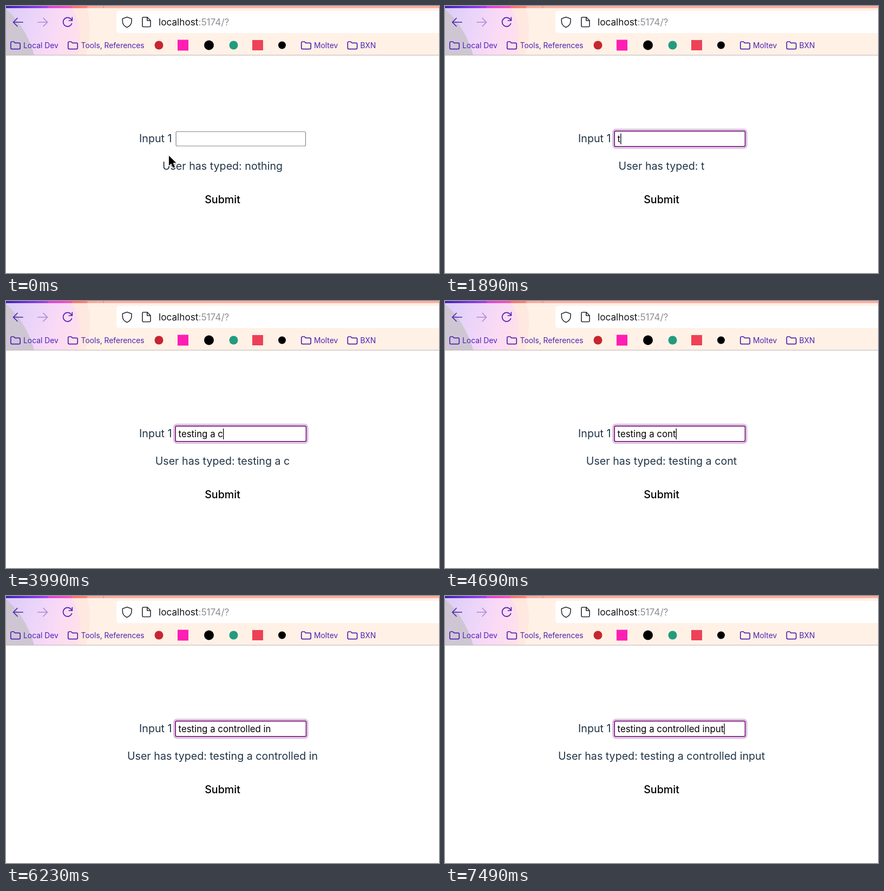
An HTML page that plays this animation: 800 by 494 pixels, repeating every 8000 ms.

```html
<!DOCTYPE html>
<html lang="en">
<head>
<meta charset="utf-8">
<title>Controlled input</title>
<style>
  html, body { margin: 0; width: 100%; height: 100%; overflow: hidden; background: #fff; }
  svg { display: block; width: 100%; height: 100%; }
  text { font-family: Inter, "Open Sans", sans-serif; white-space: pre; }
  .page { font-size: 19.65px; fill: #213547; }
  .mid { text-anchor: middle; }
  .submit { font-weight: 500; fill: #000; }
  .value { font-size: 16.82px; fill: #000; }
  .url { font-size: 17.2px; fill: #15141a; }
  .mark { font-size: 13.85px; fill: #4f22b4; }
  .line { fill: none; stroke: #4f22b4; stroke-width: 1.7; stroke-linecap: round; stroke-linejoin: round; }
  .dark { stroke: #2b2a33; stroke-width: 1.6; }
  .ring { fill: none; stroke: #8d2a97; stroke-width: 3.2; }
  .cursor { fill: #000; stroke: #fff; stroke-width: 2.4; stroke-linejoin: round; paint-order: stroke;
            filter: drop-shadow(0 1px 1px rgba(0, 0, 0, .3)); }
</style>
</head>
<body>
<svg viewBox="0 0 800 494">
  <defs>
    <linearGradient id="strip" gradientUnits="userSpaceOnUse" x1="0" x2="181" y1="0" y2="0">
      <stop offset="0" stop-color="#3f22b8"/>
      <stop offset=".25" stop-color="#7a35ea"/>
      <stop offset=".42" stop-color="#a63df0"/>
      <stop offset=".43" stop-color="#dd40e2"/>
      <stop offset=".66" stop-color="#ff4fb8"/>
      <stop offset=".68" stop-color="#ff7070"/>
      <stop offset=".82" stop-color="#ff8076"/>
      <stop offset=".84" stop-color="#ffa79b"/>
      <stop offset="1" stop-color="#ffada2"/>
    </linearGradient>
    <linearGradient id="haze" gradientUnits="userSpaceOnUse" x1="0" x2="138" y1="10" y2="50">
      <stop offset="0" stop-color="#dccdf7"/>
      <stop offset=".4" stop-color="#ecd5f9"/>
      <stop offset=".7" stop-color="#fadaf5"/>
      <stop offset="1" stop-color="#ffe0ea"/>
    </linearGradient>
    <path id="folder" d="M.8 12.6V3a2 2 0 0 1 2-2h3.6l2.3 2.4h7.5a2 2 0 0 1 2 2v7.2a2 2 0 0 1-2 2H2.8a2 2 0 0 1-2-2z"/>
  </defs>

  <!-- toolbar -->
  <rect width="800" height="91" fill="#fff1e6"/>
  <path d="M0 4H150C157 30 157 60 147 91H0z" fill="#ffe8df"/>
  <path d="M0 4H122C138 30 140 60 133 91H0z" fill="url(#haze)"/>
  <path d="M0 6C22 24 43 56 52 91H0z" fill="#cec7d3"/>
  <rect width="800" height="4" fill="#ffada2"/>
  <rect width="181" height="4" fill="url(#strip)"/>
  <rect x="180" width="1" height="4" fill="#c98880"/>
  <rect y="90.5" width="800" height="1" fill="#bdb2b0"/>
  <rect x="204" y="9" width="610" height="41" rx="5" fill="#fff"/>

  <g class="line">
    <path d="M31 30H13.5M21 22.5L13.5 30L21 37.5"/>
    <path d="M59 30H76.5M69 22.5L76.5 30L69 37.5" opacity=".42"/>
    <path d="M121.5 32.5A8.2 8.2 0 1 1 120 24.2L122 26.5M122.3 21V27H116.3"/>
    <use href="#folder" x="8" y="65"/>
    <use href="#folder" x="114" y="65"/>
    <use href="#folder" x="545" y="65"/>
    <use href="#folder" x="630.5" y="65"/>
  </g>
  <g class="line dark">
    <path d="M223.5 20.5L232 23.5V28C232 33.5 228.5 37.5 223.5 39.5C218.5 37.5 215.3 33.5 215.3 28V23.5z"/>
    <path d="M254 20.8H261L267 26.8V36.5a2 2 0 0 1-2 2H254a2 2 0 0 1-2-2V22.8a2 2 0 0 1 2-2zM260.8 21V27H267"/>
  </g>
  <text class="url" x="282" y="36">localhost<tspan fill="#8f8c93">:5174/?</tspan></text>

  <g class="mark">
    <text x="32" y="78">Local Dev</text>
    <text x="138.6" y="78">Tools, References</text>
    <text x="569" y="78">Moltev</text>
    <text x="654.5" y="78">BXN</text>
  </g>
  <circle cx="282.5" cy="72.5" r="8" fill="#c7252f"/>
  <rect x="317" y="62.5" width="20" height="20" fill="#ff1db4"/>
  <circle cx="375" cy="72.5" r="9" fill="#000"/>
  <circle cx="420.5" cy="72.5" r="8" fill="#229b7e"/>
  <rect x="455" y="63" width="20" height="19" fill="#ee4056"/>
  <circle cx="510" cy="72.5" r="7" fill="#000"/>

  <!-- form -->
  <text class="page" x="246" y="252">Input 1</text>
  <rect id="idle" x="314.1" y="232.5" width="239.4" height="26.5" rx="2" fill="#fff" stroke="#858589" stroke-width="1.2"/>
  <g id="focus">
    <rect x="310.2" y="228.2" width="247.2" height="34.8" rx="5.5" fill="#fff" stroke="#d9c2db" stroke-width="2.4"/>
    <rect x="313" y="231.4" width="241.6" height="28.6" rx="2.5" fill="#fff" stroke="#8c2f91" stroke-width="2.1"/>
  </g>
  <text id="value" class="value" x="318.6" y="252"></text>
  <rect id="caret" y="236" width="1.3" height="20" fill="#000"/>
  <text id="echo" class="page mid" x="400" y="303"></text>
  <text class="page mid submit" x="400" y="364.5">Submit</text>

  <circle id="ring" class="ring" cx="340" cy="237"/>
  <path id="cursor" class="cursor" d="M0 0V18.5L4.2 14.6L7.6 22.3L11 20.8L7.7 13.3H13.4z"/>
</svg>
<script>
  const LOOP = 8000, STEP = 70, BLINK = 560, CLICK = 770;
  const phrase = "testing a controlled input";
  // moment each letter of the phrase is typed
  const keys = [1890, 2100, 2310, 2590, 2870, 3150, 3290, 3430, 3640, 3780, 3990, 4200, 4410, 4620,
                4760, 4830, 4900, 4970, 5040, 5110, 5180, 5250, 5320, 6580, 6720, 7490];
  const $ = id => document.getElementById(id);
  const show = (el, on) => el.setAttribute("visibility", on ? "visible" : "hidden");
  const part = (t, from, to) => Math.min(1, Math.max(0, (t - from) / (to - from)));
  const smooth = p => p * p * (3 - 2 * p);
  const easeOut = p => 1 - (1 - p) ** 3;
  const [idle, focus, value, caret, echo, ring, cursor] =
    ["idle", "focus", "value", "caret", "echo", "ring", "cursor"].map($);

  function draw(time) {
    const t = Math.floor((time % LOOP) / STEP) * STEP;
    const count = keys.filter(k => k <= t).length;
    const typed = phrase.slice(0, count);
    const focused = t >= CLICK;

    show(idle, !focused);
    show(focus, focused);
    value.textContent = typed;
    echo.textContent = "User has typed: " + (typed.trimEnd() || "nothing");

    const since = t - (count ? keys[count - 1] : CLICK);
    show(caret, focused && since % (2 * BLINK) < BLINK);
    caret.setAttribute("x", 318.7 + (count ? value.getComputedTextLength() : 0));

    // approach, then a small drift after the click
    const a = smooth(part(t, 0, 560)), b = easeOut(part(t, CLICK, 1260));
    const x = 301 + 39 * a + 27 * b, y = 277 - 40 * a + 9.5 * b;
    cursor.setAttribute("transform", `translate(${x} ${y})`);
    show(cursor, !count);

    const p = part(t, CLICK, 1190);
    show(ring, focused && p < 1);
    ring.setAttribute("r", 14 + 28.4 * easeOut(p));
    ring.setAttribute("opacity", 0.63 * (1 - p));
  }

  const start = performance.now();
  function tick() {
    draw(performance.now() - start);
    requestAnimationFrame(tick);
  }
  tick();
</script>
</body>
</html>
```
